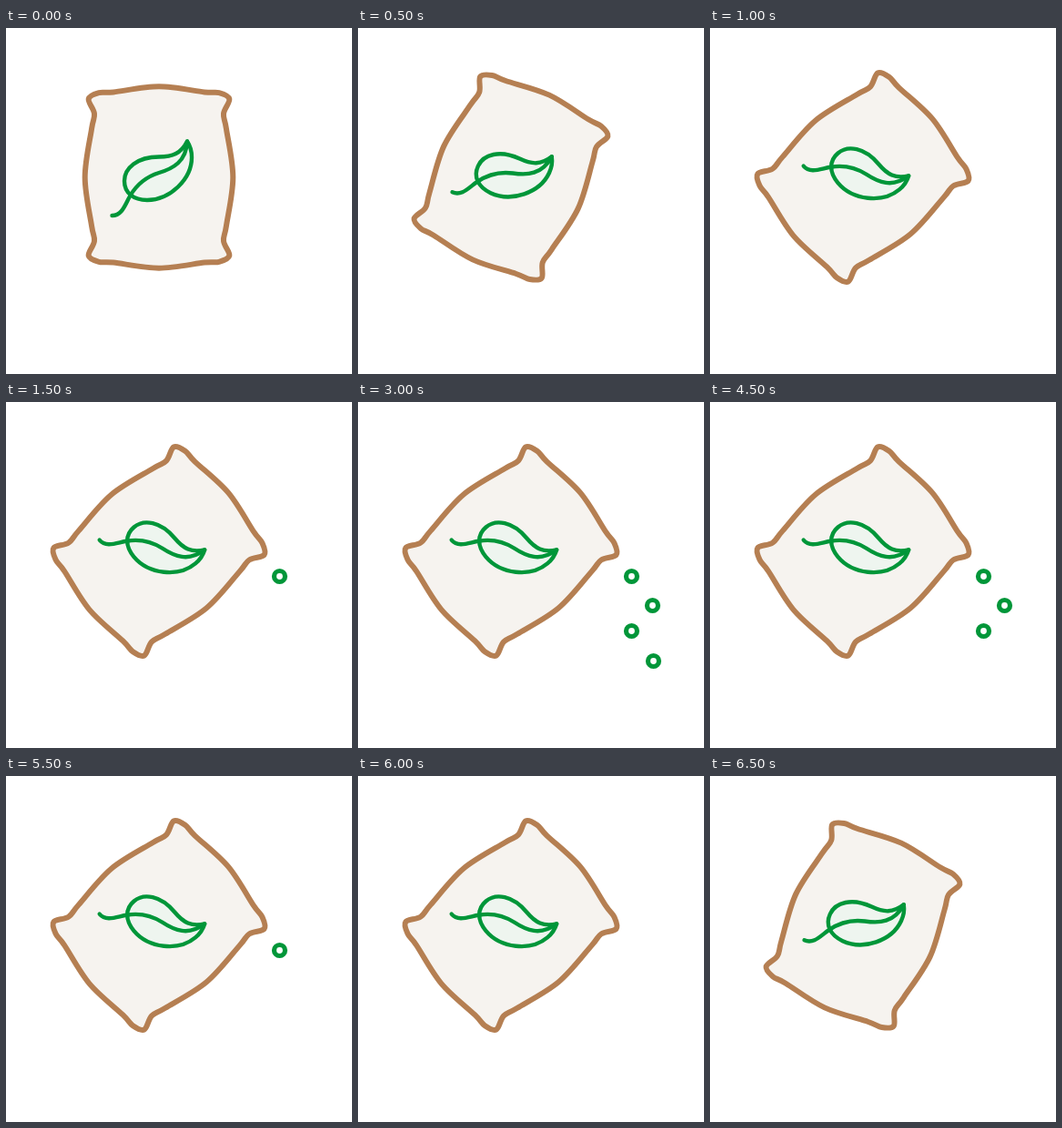
An HTML page that plays this animation: 380x380 px, repeating every 7000 ms.

```html
<!DOCTYPE html>
<html lang="en">
<head>
<meta charset="utf-8">
<title>Seed bag</title>
<style>
  html, body { margin: 0; width: 100%; height: 100%; overflow: hidden; background: #fff; }
  svg { display: block; width: 100%; height: 100%; }
  #bag, #leaf { stroke-linecap: round; stroke-linejoin: round; }
  #bag { fill: #f6f3ef; stroke: #b57f52; stroke-width: 6; }
  #leaf { fill: #eef5ef; stroke: #009639; stroke-width: 4.4; }
  #seeds { fill: #fff; stroke: #009639; stroke-width: 5.2; }
</style>
</head>
<body>
<svg viewBox="0 0 380 380">
  <g id="sack">
    <path id="bag"/>
    <g id="leaf">
      <path d="M31-39.5C24-26 15-22.5 0-22.5C-24-22.5-38-10-38 4C-38 17-28 25-13 25C12 25 36 2 36-22C36-30 34-35 31-39.5Z"/>
      <path fill="none" d="M31-39.5C30-17 15-9.5 0-5C-16 0-25 9-31.5 20C-37 29-40 42-51.5 42"/>
    </g>
  </g>
  <g id="seeds"></g>
</svg>
<script>
  const STEP = 500, STEPS = 14, TILT = 25, MAX_TILTS = 2;
  const $ = id => document.getElementById(id);

  // Closed Catmull-Rom curve as cubic path data
  function smoothRing(points) {
    const n = points.length;
    const at = i => points[(i + n) % n];
    const handle = (i, side) =>
      at(i).map((v, axis) => v + side * (at(i + 1)[axis] - at(i - 1)[axis]) / 6);
    const curves = points.map((_, i) => `C${handle(i, 1)} ${handle(i + 1, -1)} ${at(i + 1)}`);
    return `M${points[0]}${curves.join('')}Z`;
  }

  // Side, neck, lobe and top of one quarter; the others are mirrored
  const quarter = [
    [81.3, 0], [74, 53], [71, 70], [77.3, 86], [66, 92.8], [50, 93.6], [0, 99.7]
  ];
  const mirror = (sx, sy) => quarter.map(([x, y]) => [x * sx, y * sy]);
  const outline = [
    mirror(-1, -1),
    mirror(1, -1).reverse(),
    mirror(1, 1),
    mirror(-1, 1).reverse()
  ].flatMap(part => part.slice(1));
  $('bag').setAttribute('d', smoothRing(outline));

  const seeds = [[300.5, 191.5], [323.5, 223.5], [300.5, 251.5], [324.5, 284.5], [304.5, 327.5]]
    .map(([cx, cy]) => {
      const seed = document.createElementNS($('seeds').namespaceURI, 'circle');
      Object.entries({ cx, cy, r: 6 }).forEach(([k, v]) => seed.setAttribute(k, v));
      return $('seeds').appendChild(seed);
    });

  // The steps run forward to the last seed, then back again
  function render(time) {
    const step = Math.floor(time / STEP) % STEPS;
    const level = Math.min(step, STEPS - step);
    const angle = TILT * Math.min(level, MAX_TILTS);
    $('sack').setAttribute('transform', `translate(168 164) rotate(${angle})`);
    seeds.forEach((seed, i) => {
      seed.style.display = i < level - MAX_TILTS ? '' : 'none';
    });
  }

  let start;
  function tick(now) {
    start ??= now;
    render(now - start);
    requestAnimationFrame(tick);
  }
  render(0);
  requestAnimationFrame(tick);
</script>
</body>
</html>
```
